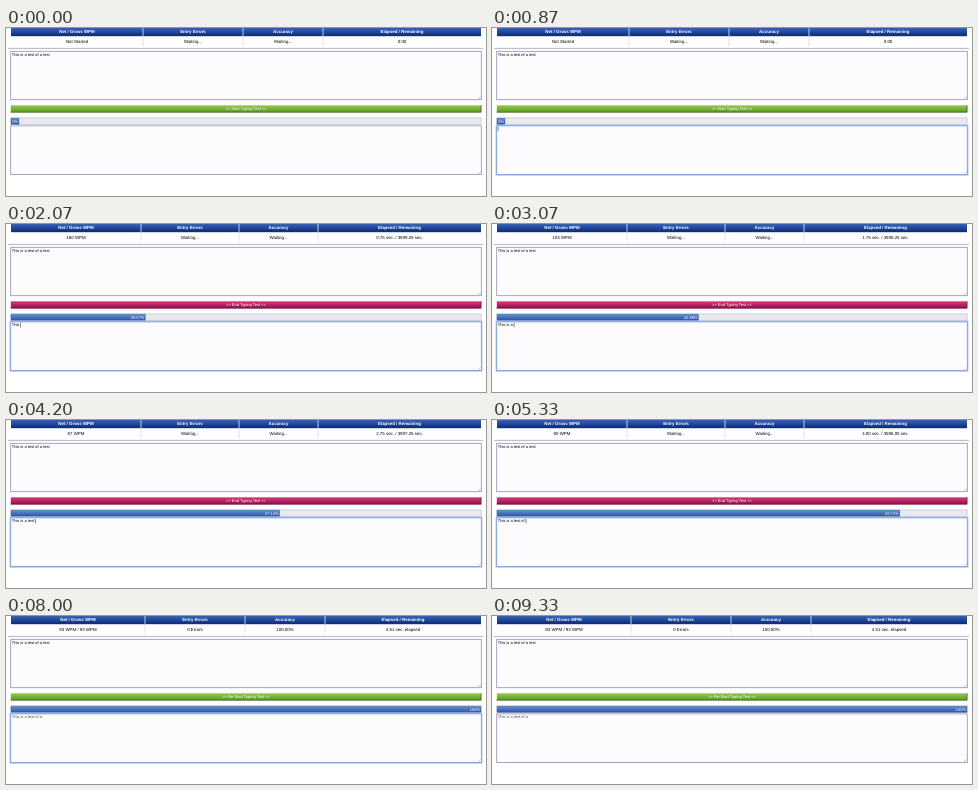
An HTML page for the animation above (9.39 s loop, 480 px wide and 168 px high).

```html
<!DOCTYPE html>
<html lang="en">
<head>
<meta charset="utf-8">
<title>Typing test</title>
<style>
html, body { margin: 0; width: 100%; height: 100%; overflow: hidden; background: #fff; }
svg { display: block; width: 480px; height: 168px; }
text {
  font: 4.4px "Liberation Sans", Arial, sans-serif;
  white-space: pre;
  text-rendering: geometricPrecision;
}
.mid { text-anchor: middle; }
.head { font-weight: bold; fill: #fff; }
.body { font-size: 4px; }
.light { font-size: 4px; fill: #fff; }
.area { fill: #fcfcfe; stroke: #8f8fb8; stroke-width: .8; }
.grip { stroke: #999; stroke-width: .4; fill: none; }
</style>
</head>
<body>
<svg viewBox="0 0 480 168">
  <defs>
    <linearGradient id="navy" x2="0" y2="1">
      <stop stop-color="#3563b4"/><stop offset=".5" stop-color="#1f479a"/><stop offset="1" stop-color="#0c2a70"/>
    </linearGradient>
    <linearGradient id="green" x2="0" y2="1">
      <stop stop-color="#94c954"/><stop offset="1" stop-color="#5c9c1e"/>
    </linearGradient>
    <linearGradient id="pink" x2="0" y2="1">
      <stop stop-color="#d63c7c"/><stop offset="1" stop-color="#930f4a"/>
    </linearGradient>
    <linearGradient id="blue" x2="0" y2="1">
      <stop stop-color="#6690d6"/><stop offset="1" stop-color="#2b559f"/>
    </linearGradient>
  </defs>

  <rect x="5" width="470" height="8.2" fill="url(#navy)"/>
  <g id="table"></g>
  <path d="M2 20.4H477" stroke="#a3a3b8" stroke-width=".8"/>

  <rect class="area" x="4.7" y="23.3" width="470.6" height="48.4"/>
  <path class="grip" d="M472 71l2.8-2.8M473.6 71l1.2-1.2"/>
  <text class="body" x="5.8" y="27.9">This is a test of a test</text>

  <rect id="button" x="4.8" y="77.3" width="470.2" height="6.9"/>
  <path id="edge" d="M4.6 84.2H475.1V77.2" fill="none" stroke-width=".8"/>
  <text id="action" class="light mid" x="240" y="82.1"></text>

  <rect x="4.9" y="89.9" width="470.2" height="6.6" fill="#e8e8ee" stroke="#b9b9c4" stroke-width=".6"/>
  <rect id="bar" x="5" y="90.1" height="6.2" fill="url(#blue)" stroke="#3a62aa" stroke-width=".4"/>
  <text id="percent" class="light" y="94.5" text-anchor="end"></text>

  <rect id="glow" x="4.5" y="97.6" width="471" height="49.2" fill="none" stroke="#a9c4ee" stroke-width="1.8"/>
  <rect id="entry" class="area" x="4.7" y="97.9" width="470.6" height="48.6"/>
  <path class="grip" d="M472 145.8l2.8-2.8M473.6 145.8l1.2-1.2"/>
  <text id="typed" class="body" x="5.8" y="102.4"></text>
  <rect id="caret" y="98.8" width=".5" height="4.6" fill="#111"/>
</svg>
<script>
const LOOP = 9390, FOCUS = 600, START = 1270, BLUR = 8500;
const TICK = 250, DURATION = 4510, WORDS = 7;
const PHRASE = "This is a test of a ";
const HEADS = ["Net / Gross WPM", "Entry Errors", "Accuracy", "Elapsed / Remaining"];
const LAYOUT = {
  idle: [5, 137, 237, 317, 475],
  run: [5, 135, 233, 312, 475],
  done: [5, 139, 239, 319, 475]
};
const $ = id => document.getElementById(id);
const set = (el, attrs) => {
  for (const k in attrs) el.setAttribute(k, attrs[k]);
  return el;
};
const add = (tag, attrs, text = "") => {
  const el = set(document.createElementNS("http://www.w3.org/2000/svg", tag), attrs);
  el.textContent = text;
  return $("table").appendChild(el);
};

const columns = HEADS.map((label, i) => ({
  rule: i && add("path", { stroke: "#d4d4de", "stroke-width": .7 }),
  gap: i && add("path", { stroke: "#e6ebf5", "stroke-width": .8 }),
  head: add("text", { class: "head mid", y: 4.8 }, label),
  cell: add("text", { class: "mid", y: 14.7 })
}));

// Typing comes in three paces: the first word, the middle, the end.
const keyTime = k =>
  k <= 4 ? 180 * k : k <= 14 ? 720 + 211 * (k - 4) : 2830 + 336 * (k - 14);

function textAt(t) {
  let n = 0;
  while (n < PHRASE.length && keyTime(n) <= t) n++;
  return PHRASE.slice(0, n);
}

function stateAt(t) {
  const run = t - START;
  if (run >= DURATION) return {
    mode: "done", text: PHRASE.trim(), done: 1,
    cells: ["93 WPM / 93 WPM", "0 Errors", "100.00%", "4.51 sec. elapsed"]
  };
  const text = textAt(run);
  const tick = Math.floor(run / TICK) * TICK;
  if (tick <= 0) return {
    mode: run < 0 ? "idle" : "run", text, done: 0,
    cells: ["Not Started", "Waiting...", "Waiting...", "0:00"]
  };
  const count = textAt(tick).split(" ").length;
  const sec = tick / 1000;
  return {
    mode: "run", text, done: count / WORDS,
    cells: [
      Math.round(count * 60 / sec) + " WPM", "Waiting...", "Waiting...",
      `${sec.toFixed(2)} sec. / ${(3600 - sec).toFixed(2)} sec.`
    ]
  };
}

function draw(t) {
  const { mode, text, done, cells } = stateAt(t);
  const edges = LAYOUT[mode];
  columns.forEach((c, i) => {
    const x = (edges[i] + edges[i + 1]) / 2;
    set(c.head, { x });
    set(c.cell, { x }).textContent = cells[i];
    if (i) {
      set(c.gap, { d: `M${edges[i]} 0V8.2` });
      set(c.rule, { d: `M${edges[i]} 8.2V18.5` });
    }
  });

  const running = mode === "run";
  set($("button"), { fill: running ? "url(#pink)" : "url(#green)" });
  set($("edge"), { stroke: running ? "#701040" : "#38601a" });
  const verb = { idle: "Start", run: "End", done: "Re-Start" }[mode];
  $("action").textContent = `>> ${verb} Typing Test <<`;

  const width = Math.max(8, 470 * done);
  set($("bar"), { width });
  set($("percent"), { x: 4 + width }).textContent =
    done % 1 ? (done * 100).toFixed(2) + "%" : done * 100 + "%";

  const focused = t >= FOCUS && t < BLUR;
  set($("glow"), { visibility: focused ? "visible" : "hidden" });
  $("entry").style.stroke = focused ? "#7898d2" : "";
  set($("typed"), { fill: mode === "done" ? "#555" : "#000" }).textContent = text;

  const lastKey = text ? START + keyTime(text.length - 1) : FOCUS;
  const blinkOn = (t - lastKey) % 1000 < 500;
  set($("caret"), {
    x: 5.8 + $("typed").getComputedTextLength(),
    visibility: focused && mode !== "done" && blinkOn ? "visible" : "hidden"
  });
}

const origin = performance.now();
function frame() {
  draw((performance.now() - origin) % LOOP);
  requestAnimationFrame(frame);
}
frame();
</script>
</body>
</html>
```
